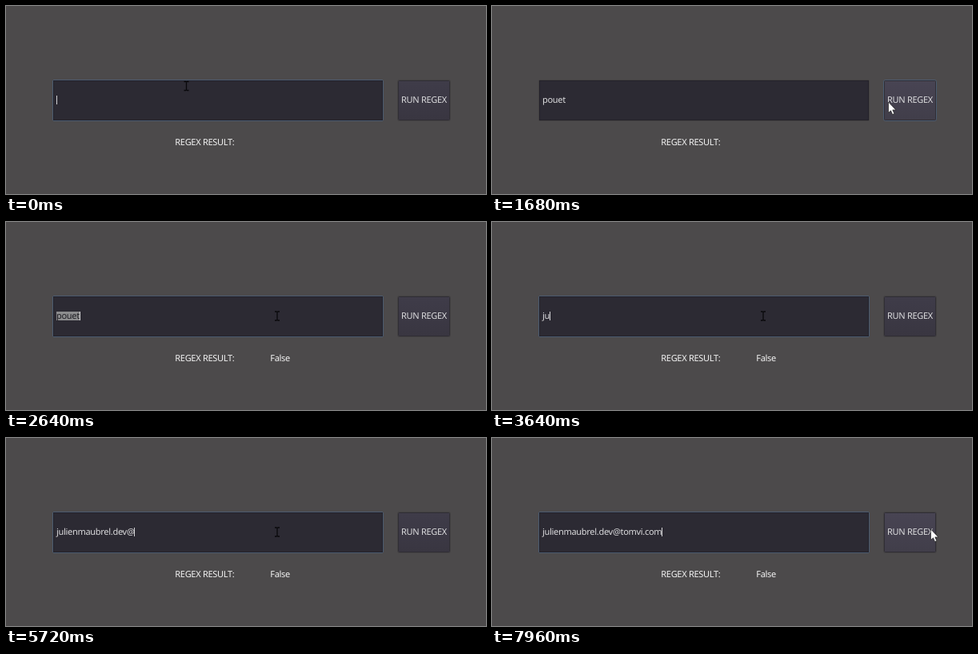
Recreate the animation shown at these times as an HTML page. Size 600x235 px, loop 8 s.

```html
<!DOCTYPE html>
<html lang="en">
<head>
<meta charset="utf-8">
<title>Regex tester</title>
<style>
  html, body { margin: 0; width: 100%; height: 100%; overflow: hidden; background: #4c4a4b; }
  svg { display: block; }
  text { font: 11px "Noto Sans", "Open Sans", sans-serif; letter-spacing: -.3px; fill: #f4f4f4; text-rendering: geometricPrecision; }
  rect { stroke-width: 1; }
  #input, #label { fill: #dcdcde; }
  #input.selected { fill: #1f1e24; }
  #field { fill: #2c2a33; stroke: #24222a; }
  #button { fill: url(#normal); stroke: #302e35; }
  #button.hover { fill: url(#lit); }
  .ring { fill: none; stroke: #434142; }
  .ring.focus { stroke: #4b5b70; }
</style>
</head>
<body>
<svg width="600" height="235" viewBox="0 0 600 235">
  <defs>
    <linearGradient id="normal" x2="0" y2="1">
      <stop stop-color="#3f3c49"/><stop offset="1" stop-color="#393641"/>
    </linearGradient>
    <linearGradient id="lit" x2="0" y2="1">
      <stop stop-color="#484453"/><stop offset="1" stop-color="#413e4a"/>
    </linearGradient>
  </defs>
  <rect id="fieldRing" class="ring" x="58.5" y="92.5" width="413" height="51" rx="1.5"/>
  <rect id="field" x="59.5" y="93.5" width="411" height="49"/>
  <rect id="buttonRing" class="ring" x="489.5" y="92.5" width="66" height="51" rx="2"/>
  <rect id="button" x="490.5" y="93.5" width="64" height="49" rx="1"/>
  <rect id="selection" x="63" y="112" height="11" fill="#8c8c8e"/>
  <text id="input" x="63" y="121"></text>
  <rect id="caret" y="112" width="1" height="11" fill="#d4d4d6"/>
  <text id="label" x="494" y="121">RUN REGEX</text>
  <text x="211.3" y="174">REGEX RESULT:</text>
  <text id="result" x="330.3" y="174">False</text>
  <path id="beam" d="M-3 -5.5H-1L0 -5L1 -5.5H3M0 -5V5M-3 5.5H-1L0 5L1 5.5H3" fill="none" stroke="#08080b" stroke-width="1.3"/>
  <path id="arrow" d="M0 0V13.5L3 10.8L5.1 15.6L7.4 14.6L5.3 9.9H9.4Z" fill="#fff" stroke="#222" stroke-width=".7"/>
</svg>
<script>
const LOOP = 8000, STEP = 40;
const PRESS = 1640, RESULT = 1720, REFOCUS = 2520, SELECT = 2600, RETYPE = 3160;

// Bursts of evenly spaced keystrokes
const bursts = [
  { text: "pouet", from: 440, to: 720 },
  { text: "ju", from: RETYPE, to: 3640 },
  { text: "lienmaub", from: 3800, to: 4560 },
  { text: "rel", from: 4680, to: 4800 },
  { text: ".dev", from: 5160, to: 5560 },
  { text: "@to", from: 5720, to: 5960 },
  { text: "mvi", from: 6120, to: 6320 },
  { text: ".com", from: 6480, to: 6840 }
];

const rest = { x: 225.5, y: 100 };
const moves = [
  { from: 1160, to: 1480, x: 487, y: 110 },
  { from: 1480, to: 1640, x: 495.5, y: 120 },
  { from: 2180, to: 2520, x: 339, y: 117.5 },
  { from: 7600, to: 7960, x: 548.5, y: 114 }
];

const $ = id => document.getElementById(id);
const show = (id, on) => $(id).setAttribute("visibility", on ? "visible" : "hidden");
const clamp = u => Math.min(1, Math.max(0, u));
const progress = (t, { from, to }) => (t - from) / (to - from);

function typed(t) {
  const current = bursts.filter(b => b.from <= t && (t < RETYPE || b.from >= RETYPE));
  return current.map(b => b.text.slice(0, 1 + Math.floor(clamp(progress(t, b)) * (b.text.length - 1)))).join("");
}

function pointer(t) {
  return moves.reduce((p, m) => {
    const u = clamp(progress(t, m)), e = u * u * (3 - 2 * u);
    return { x: p.x + (m.x - p.x) * e, y: p.y + (m.y - p.y) * e };
  }, rest);
}

function draw(t) {
  const { x, y } = pointer(t);
  const buttonFocus = t >= PRESS && t < REFOCUS;
  const selected = t >= SELECT && t < RETYPE;
  const overField = x >= 59 && x <= 472;

  $("input").textContent = typed(t);
  const width = $("input").getComputedTextLength();
  $("input").classList.toggle("selected", selected);
  $("selection").setAttribute("width", width);
  $("caret").setAttribute("x", Math.round(63 + width - .4));
  $("fieldRing").classList.toggle("focus", !buttonFocus);
  $("buttonRing").classList.toggle("focus", buttonFocus);
  $("button").classList.toggle("hover", x >= 490);

  show("selection", selected);
  show("caret", !buttonFocus);
  show("result", t >= RESULT);
  show("beam", overField);
  show("arrow", !overField);
  $(overField ? "beam" : "arrow").setAttribute("transform", `translate(${x} ${y})`);
}

const start = performance.now();
function tick() {
  const t = (performance.now() - start) % LOOP;
  draw(Math.floor(t / STEP) * STEP);
  requestAnimationFrame(tick);
}
tick();
</script>
</body>
</html>
```
